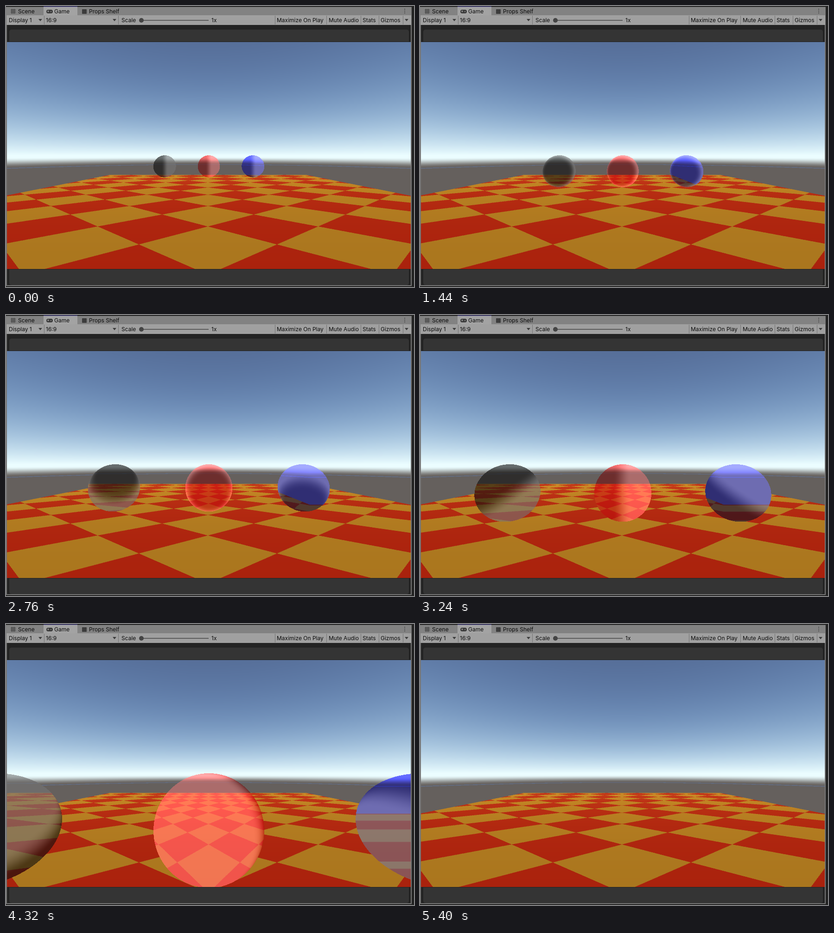
These frames come from a looping animation (880 by 608 pixels, 5460 ms). An HTML page with a canvas:

```html
<!DOCTYPE html>
<html>
<head>
<meta charset="utf-8">
<style>
  html, body { margin: 0; width: 880px; height: 608px; overflow: hidden; background: #232323; }
  canvas { display: block; }
</style>
</head>
<body>
<canvas id="stage" width="880" height="608"></canvas>
<script>
const LOOP = 5460, STEP = 60;
const W = 871, H = 491, LEFT = 2, TOP = 78, FOCAL = 426, CX = 435.5, CY = 245;
const NEAR = 0.3, GLOW = 62, AMBIENT = 8;
const SPIN = 0.555 * Math.PI / 180; // radians per ms
const ctx = document.getElementById('stage').getContext('2d');

const clamp = (v, lo, hi) => Math.max(lo, Math.min(hi, v));
const smooth = (lo, hi, v) => {
  const k = clamp((v - lo) / (hi - lo), 0, 1);
  return k * k * (3 - 2 * k);
};
const mix = (a, b, k) => a.map((v, i) => v + (b[i] - v) * k);

// slope is the tangent of the elevation
function sky(slope) {
  const up = Math.max(slope, 0);
  const air = [
    80 + 155 * Math.exp(-up / 0.18),
    98 + 155 * Math.exp(-up / 0.23),
    130 + 125 * Math.exp(-up / 0.34)
  ];
  const ground = Math.abs(slope + 0.0465) < 0.0012 ? [98, 112, 138] : [101, 96, 93];
  return mix(air, ground, smooth(-0.008, -0.046, slope));
}

function floorTile(x, depth) {
  const p = x / 0.772, q = (depth - 2.766) / 0.558;
  const odd = (Math.floor((p + q) / 2) + Math.floor((q - p) / 2)) & 1;
  const far = clamp((depth - 1.7) / 7, 0, 1);
  return odd ? mix([170, 34, 13], [196, 56, 24], far)
             : mix([170, 118, 30], [200, 137, 38], far);
}

function backdrop(px, py) {
  const dx = px - CX, dy = CY - py;
  const depth = -FOCAL / dy, x = (dx + 2) / FOCAL * depth;
  const onFloor = dy < 0 && depth < 10 && Math.abs(x) < 5;
  return onFloor ? floorTile(x, depth) : sky(dy / Math.hypot(FOCAL, dx));
}

const scene = ctx.createImageData(W, H);
for (let y = 0, i = 0; y < H; y++)
  for (let x = 0; x < W; x++, i += 4) {
    const soft = mix(backdrop(x + 0.25, y + 0.25), backdrop(x + 0.75, y + 0.75), 0.5);
    scene.data.set([...soft, 255], i);
  }
const view = ctx.createImageData(W, H);

// tint multiplies what is behind; bend is the horizontal scale of the view through the glass
const SPHERES = [
  { side: -1, tint: [0.4, 0.4, 0.4], bend: 0.5 },
  { side: 0, tint: [1, 0.4, 0.4], bend: 2.2 },
  { side: 1, tint: [0.4, 0.4, 1.15], bend: 2 }
];

// The dark side spins about the vertical axis and leans more and more before recovering.
function darkSide(ms, side) {
  const turn = SPIN * ms - Math.PI / 2;
  const lean = -1.5 * side * Math.sin(Math.PI * (ms / 3900) ** 5);
  const x = Math.sin(turn), toward = Math.cos(turn), len = Math.hypot(1, lean);
  return { x: x / len, y: lean / len, z: toward / len, edge: 0.5 * Math.max(toward, 0) ** 2 };
}

function drawSphere({ side, tint, bend }, z, ms) {
  const cx = 2 * side, reach = Math.hypot(cx, z);
  const dark = darkSide(ms, side);
  // Turn the dark side from the line of sight into scene axes.
  const dx = (dark.x * z - dark.z * cx) / reach;
  const dz = -(dark.x * cx + dark.z * z) / reach;
  const src = scene.data, out = view.data;
  for (let py = CY - 2; py < H; py++) {
    const Y = (CY - py - 0.5) / FOCAL;
    for (let px = 0; px < W; px++) {
      const X = (px + 0.5 - CX) / FOCAL;
      const a = X * X + Y * Y + 1, b = cx * X - 0.5 * Y + z;
      const disc = b * b - a * reach * reach;
      if (disc < 0) continue;
      const t = (b - Math.sqrt(disc)) / a;
      if (t < NEAR) continue;
      const facing = 2 * ((X * t - cx) * dx + (Y * t + 0.5) * dark.y + (t - z) * dz);
      const light = AMBIENT + GLOW * smooth(dark.edge + 0.28, dark.edge - 0.28, facing);
      const from = 4 * (py * W + clamp(Math.round(CX + (px - CX) * bend), 0, W - 1));
      const to = 4 * (py * W + px);
      for (let c = 0; c < 3; c++) out[to + c] = src[from + c] * tint[c] + light;
    }
  }
}

function drawView(ms) {
  view.data.set(scene.data);
  const z = ms < STEP ? 8.97 : 8.415 - 0.001519 * ms; // a jump on the first step, then steady
  if (z > NEAR) for (const s of SPHERES) drawSphere(s, z, ms);
  ctx.putImageData(view, LEFT, TOP);
}

function box(color, x, y, w, h, r = 0) {
  ctx.fillStyle = color;
  ctx.beginPath();
  ctx.roundRect(x, y, w, h, r);
  ctx.fill();
}

function arrow(x) {
  ctx.fillStyle = '#3c3c3c';
  ctx.beginPath();
  ctx.moveTo(x - 4, 28);
  ctx.lineTo(x + 4, 28);
  ctx.lineTo(x, 33);
  ctx.fill();
}

function drawWindow() {
  const ink = '#3c3c3c', tab = '#a3a3a3', border = '#777';
  box('#232323', 0, 0, 880, 608);
  box(border, 0, 2, 2, 604);
  box(border, 873, 2, 2, 604);
  box(border, 0, 604, 875, 2);
  box('#828282', 0, 2, 874, 18);
  box(tab, 81, 2, 73, 18);
  box('#4f4a9c', 81, 1, 73, 1);
  box('#a0a0a0', 1, 20, 873, 21);
  box('#343434', 7, 51, 862, 26, [5, 5, 0, 0]);
  box('#343434', 7, 570, 862, 34, [0, 0, 5, 5]);
  for (const x of [82, 242, 580, 691, 765, 804, 856]) box('#747474', x, 21, 1, 19);

  for (const d of [12, 15, 18]) {
    box(ink, d, 6, 1, 11);
    box(ink, 10, d - 4, 11, 1);
  }
  box(ink, 87, 8, 14, 8, 4);
  box(tab, 89, 11, 4, 1);
  box(tab, 90.5, 9.5, 1, 4);
  box(tab, 96, 11, 2, 2, 1);
  box(ink, 164, 7, 10, 10, 1);
  for (const y of [6, 10, 14]) box(ink, 859, y, 2, 2, 1);

  box('#5c5c5c', 292, 30, 145, 2);
  box('#444', 287, 26, 10, 10, 5);
  [74, 234, 864].forEach(arrow);

  ctx.font = '12px Inter, sans-serif';
  ctx.fillStyle = '#0c0c0c';
  const label = (text, x, y = 35) => ctx.fillText(text, x, y);
  label('Scene', 26, 16);
  label('Game', 104, 16);
  label('Props Shelf', 179, 16);
  label('Display 1', 6);
  label('16:9', 86);
  label('Scale', 249);
  label('1x', 443);
  label('Maximize On Play', 584);
  label('Mute Audio', 696);
  label('Stats', 769);
  label('Gizmos', 808);
}

let shown = -1;
const start = performance.now();
function tick() {
  const ms = Math.floor((performance.now() - start) % LOOP / STEP) * STEP;
  if (ms !== shown) drawView(shown = ms);
  requestAnimationFrame(tick);
}
drawWindow();
tick();
</script>
</body>
</html>
```
